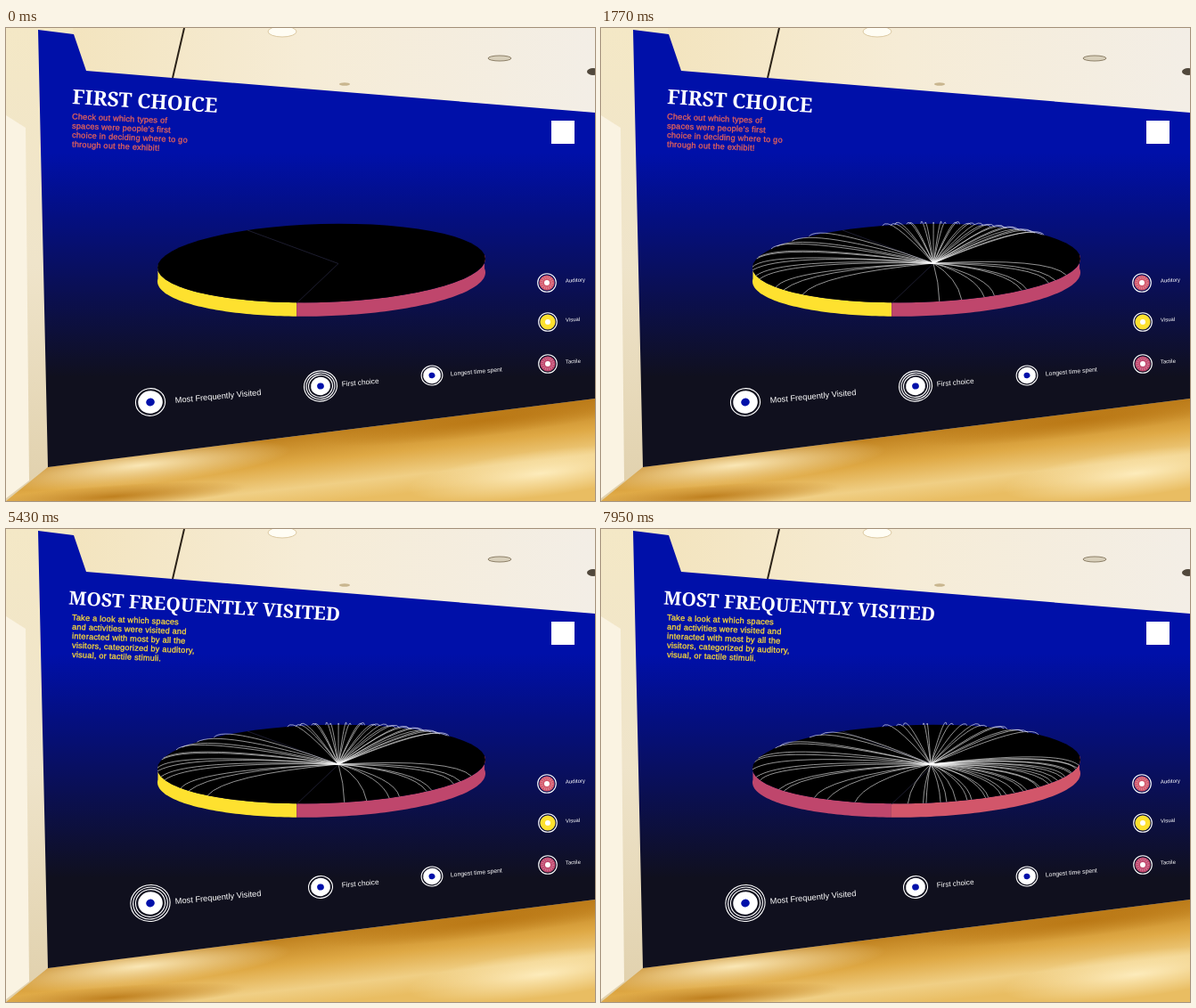
These frames come from a looping animation (661x531 px, 8000 ms). An HTML page:

```html
<!DOCTYPE html>
<html lang="en">
<head>
<meta charset="utf-8">
<title>Exhibit wall chart</title>
<style>
html, body { margin: 0; width: 100%; height: 100%; overflow: hidden; background: #f4e6c8; }
svg { display: block; width: 100%; height: 100%; }
text { font-family: "Liberation Sans", Arial, sans-serif; fill: #fff; }
.title { font: 700 22.7px "Noto Serif", serif; }
.note { font-size: 9.1px; letter-spacing: .25px; stroke-width: .3; }
.ring { fill: none; stroke: #fff; stroke-width: 1.1; }
.line { fill: none; stroke: #fff; stroke-width: .7; opacity: .82; }
</style>
</head>
<body>
<svg viewBox="0 0 661 531">
  <defs>
    <linearGradient id="wall" gradientUnits="userSpaceOnUse" x1="0" y1="140" x2="0" y2="392">
      <stop offset="0" stop-color="#0010a9"/>
      <stop offset=".28" stop-color="#040f82"/>
      <stop offset=".6" stop-color="#0a0f55"/>
      <stop offset="1" stop-color="#10101e"/>
    </linearGradient>
    <linearGradient id="ceiling">
      <stop offset="0" stop-color="#f3e4be"/>
      <stop offset=".45" stop-color="#f6ecd6"/>
      <stop offset="1" stop-color="#f3eee6"/>
    </linearGradient>
    <linearGradient id="floor" gradientUnits="userSpaceOnUse" x1="330" y1="455" x2="339" y2="535">
      <stop offset="0" stop-color="#bd7e1c"/>
      <stop offset=".4" stop-color="#dfa945"/>
      <stop offset=".75" stop-color="#f0cf85"/>
      <stop offset="1" stop-color="#e9bd62"/>
    </linearGradient>
    <linearGradient id="pillar" x1="0" y1="0" x2="0" y2="1">
      <stop offset="0" stop-color="#f4e8c6"/>
      <stop offset=".5" stop-color="#efe4ca"/>
      <stop offset="1" stop-color="#e0d0ac"/>
    </linearGradient>
    <radialGradient id="glow">
      <stop offset="0" stop-color="#fff0c4" stop-opacity=".9"/>
      <stop offset="1" stop-color="#fff0c4" stop-opacity="0"/>
    </radialGradient>
    <radialGradient id="shade">
      <stop offset="0" stop-color="#b87512" stop-opacity=".85"/>
      <stop offset="1" stop-color="#b87512" stop-opacity="0"/>
    </radialGradient>
    <clipPath id="ground"><path d="M0 531L47 493L661 416V531Z"/></clipPath>
  </defs>

  <!-- room -->
  <path fill="url(#ceiling)" d="M70 0H661V98L90 50Z"/>
  <path fill="url(#pillar)" d="M0 0H75L76 8L38 4L48 495L0 531Z"/>
  <path fill="#faf3e2" d="M0 98L22 112L26 508L0 528Z"/>
  <g clip-path="url(#ground)">
    <path fill="url(#floor)" d="M0 410H661V531H0Z"/>
    <ellipse cx="150" cy="491" rx="170" ry="22" fill="url(#glow)" transform="rotate(-6 150 491)"/>
    <ellipse cx="600" cy="500" rx="150" ry="26" fill="url(#glow)" transform="rotate(-7 600 500)"/>
    <ellipse cx="540" cy="440" rx="190" ry="18" fill="url(#shade)" transform="rotate(-7 540 440)"/>
    <ellipse cx="120" cy="526" rx="150" ry="13" fill="url(#shade)" transform="rotate(-4 120 526)"/>
  </g>
  <path stroke="#2b2218" stroke-width="2" d="M200 0L187 56"/>
  <ellipse cx="310" cy="4" rx="16" ry="6" fill="#fffdf4" stroke="#dcc9a2"/>
  <ellipse cx="554" cy="34" rx="13" ry="3" fill="#d8cfba" stroke="#8d8068"/>
  <ellipse cx="659" cy="49" rx="7" ry="4" fill="#51483c"/>
  <ellipse cx="380" cy="63" rx="6" ry="1.8" fill="#c9b68f"/>

  <path fill="url(#wall)" d="M36 2L76 7L90 48L661 95V416L47 493Z"/>
  <rect x="612" y="104" width="26" height="26" fill="#fff"/>

  <g id="old">
    <text class="title" transform="translate(74 85) rotate(3.5)">FIRST CHOICE</text>
  </g>
  <g id="new">
    <text class="title" style="font-size:21px" transform="translate(70 84.5) rotate(3.5)">MOST FREQUENTLY VISITED</text>
  </g>

  <!-- disk -->
  <g id="rim"></g>
  <path id="top"/>
  <path fill="none" stroke="#24243a" stroke-width=".8" d="M271 227L373 264.5L326 309"/>
  <g id="first"></g>
  <g id="second"></g>
  <g id="icons"></g>
</svg>
<script>
const $ = id => document.getElementById(id);
const add = (parent, tag, attrs, text = '') => {
  const el = document.createElementNS('http://www.w3.org/2000/svg', tag);
  for (const k in attrs) el.setAttribute(k, attrs[k]);
  el.textContent = text;
  parent.append(el);
  return el;
};
const clamp = x => Math.min(1, Math.max(0, x));
const ease = x => x * x * (3 - 2 * x);
const ramp = (t, a, b) => ease(clamp((t - a) / (b - a)));
const label = (x, y, size, angle, text) => add($('icons'), 'text',
  { transform: `translate(${x} ${y}) rotate(${angle})`, 'font-size': size }, text);

// paragraphs
function note(id, color, lines) {
  lines.forEach((s, i) => add($(id), 'text', {
    class: 'note', style: `fill:${color};stroke:${color}`,
    transform: `translate(74 ${102.3 + i * 10.4}) rotate(2.5)`
  }, s));
}
note('old', '#e5625a', ['Check out which types of', 'spaces were people’s first',
  'choice in deciding where to go', 'through out the exhibit!']);
note('new', '#fbd93a', ['Take a look at which spaces', 'and activities were visited and',
  'interacted with most by all the', 'visitors, categorized by auditory,', 'visual, or tactile stimuli.']);

// buttons and legend; returns the two rings that mark a selected button
function button(x, y, r, step) {
  const oval = (r, attrs) => add($('icons'), 'ellipse',
    { cx: x, cy: y, rx: r, ry: r * .92, transform: `rotate(-12 ${x} ${y})`, ...attrs });
  oval(r, { fill: '#fff' });
  oval(r * .35, { fill: '#0010a9' });
  oval(r + step, { class: 'ring' });
  return [2, 3].map(n => oval(r + step * n, { class: 'ring' }));
}
const visited = button(162, 420, 13.8, 2.8);
const choice = button(353, 402, 11, 2.5);
button(478, 390, 10, 1.9).forEach(e => e.remove());
label(190, 421, 9.3, -5.3, 'Most Frequently Visited');
label(377, 402.5, 8.2, -5, 'First choice');
label(499, 390.5, 6.9, -5, 'Longest time spent');

const yellow = '#fee12f', pink = '#bf466c', red = '#d2566a';
[['Auditory', 607, 286, red], ['Visual', 608, 330, yellow], ['Tactile', 608, 377, pink]]
  .forEach(([name, cx, cy, fill]) => {
    add($('icons'), 'circle', { cx, cy, r: 10.3, class: 'ring' });
    add($('icons'), 'circle', { cx, cy, r: 8.6, fill });
    if (name != 'Visual') add($('icons'), 'circle', { cx, cy, r: 5.8, class: 'ring',
      'stroke-dasharray': '.8 1.4', style: 'stroke-width:3;opacity:.35' });
    add($('icons'), 'circle', { cx, cy, r: 3, fill: '#fff' });
    label(628, cy - .3, 6, -3, name);
  });

// disk: angles in degrees, 0 at the right, 90 at the front
const rimPoint = a => {
  const c = Math.cos(a * Math.PI / 180), s = Math.sin(a * Math.PI / 180);
  return [354 + 184 * c, 264 + 44 * s - 5 * c];
};
function arc(a, b) {
  const pts = [];
  for (let i = 0; i <= 60; i++) pts.push(rimPoint(a + (b - a) * i / 60));
  return pts;
}
$('top').setAttribute('d', 'M' + arc(0, 360).join('L') + 'Z');

function band(a, b) {
  if (b <= a) return '';
  const upper = arc(a, b);
  const lower = upper.map(([x, y]) => [x, y + 15.5]).reverse();
  return 'M' + upper.concat(lower).join('L') + 'Z';
}
const bands = [yellow, pink, red].map(fill => add($('rim'), 'path', { fill }));

// arched lines from the hub to the rim
function fan(id, cx, ranges) {
  const group = $(id), cy = 264;
  const lines = [];
  for (const [from, to, n] of ranges) for (let i = 0; i < n; i++) {
    const a = from + (to - from) * (i + .35 * Math.sin(i * 2.7)) / (n - 1);
    const [x, y] = rimPoint(a);
    const k = .87 + .05 * Math.sin(i * 4.1);
    const mx = cx + (x - cx) * k, my = cy + (y - cy) * k - 18;
    lines.push(add(group, 'path', {
      class: 'line', pathLength: 1, 'stroke-dasharray': '1 2',
      d: `M${cx} ${cy}Q${mx} ${my} ${x} ${y}`
    }));
  }
  return g => {
    group.style.display = g > 0 ? '' : 'none';
    for (const l of lines) l.setAttribute('stroke-dashoffset', 1 - g);
  };
}
const growFirst = fan('first', 373, [[134, 160, 4], [168, 228, 9], [258, 322, 26], [24, 81, 9]]);
const growSecond = fan('second', 370, [[8, 92, 27], [112, 236, 14], [258, 318, 15]]);

// value at t from a few [time, value] pairs
function keyed(t, keys) {
  let v = keys[0][1];
  for (let i = 1; i < keys.length; i++) {
    const [t0, v0] = keys[i - 1], [t1, v1] = keys[i];
    if (t > t0) v = v0 + (v1 - v0) * clamp((t - t0) / (t1 - t0));
  }
  return v;
}

function draw(t) {
  growFirst(ramp(t, 30, 1100) - ramp(t, 5570, 6150));
  growSecond(ramp(t, 7050, 7940));

  const yellowEnd = keyed(t, [[5950, 98.7], [6360, 126.3], [7000, 184]]);
  const pinkEnd = keyed(t, [[5950, -6], [6360, 62.2], [7000, 99]]);
  [[yellowEnd, 184], [pinkEnd, yellowEnd], [-6, pinkEnd]]
    .forEach(([a, b], i) => bands[i].setAttribute('d', band(a, b)));

  const swap = ramp(t, 3200, 3750);
  visited.forEach(e => e.style.opacity = swap);
  choice.forEach(e => e.style.opacity = 1 - swap);
  $('old').style.opacity = 1 - ramp(t, 3930, 4350);
  $('new').style.opacity = ramp(t, 4350, 4800);
}

const start = performance.now();
function tick() {
  draw((performance.now() - start) % 8000);
  requestAnimationFrame(tick);
}
tick();
</script>
</body>
</html>
```
